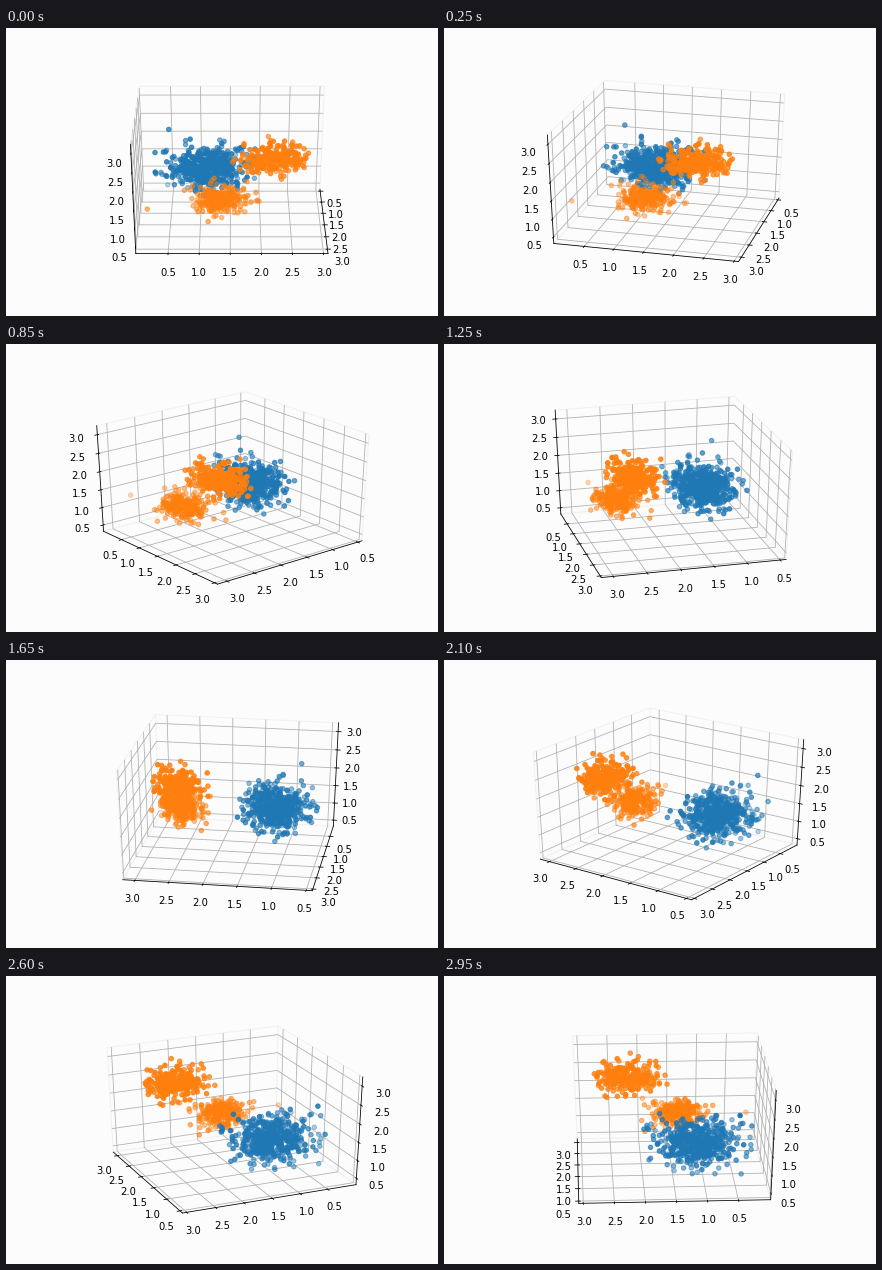
A matplotlib script for the animation above (3000 ms loop, 432x288 px).

```python
import numpy as np
import matplotlib.pyplot as plt
from matplotlib.animation import FuncAnimation

BG = "#fcfcfc"
FRAMES = 60
STEP = 180 / FRAMES  # half a turn per loop

rng = np.random.default_rng(4)


def blob(center, sigma, count):
    spread = np.clip(rng.normal(size=(count, 3)), -2.8, 2.8)
    return np.array(center) + spread * sigma


blue = np.vstack([
    blob((1.18, 1.11, 1.43), (0.22, 0.31, 0.27), 500),
    (0.89, 0.47, 2.32),  # lone high point
])
orange = np.vstack([
    blob((2.50, 2.19, 2.45), (0.17, 0.25, 0.19), 250),
    blob((2.56, 1.35, 1.40), (0.15, 0.22, 0.17), 250),
    (2.76, 0.17, 1.27),  # lone stray
])

fig = plt.figure(figsize=(6, 4), dpi=72, facecolor=BG)
fig.subplots_adjust(bottom=0.125)
ax = fig.add_subplot(projection="3d", facecolor=BG)

# Stretch a unit cube over the whole subplot instead of a square view.
ax.apply_aspect = lambda position=None: None
ax.set_box_aspect((1, 1, 1), zoom=3 ** 0.5 / 1.8294640721620434)

for points, color in ((blue, "tab:blue"), (orange, "tab:orange")):
    ax.scatter(*points.T, s=20, color=color)

ax.set(xlim=(0.411, 3.176), ylim=(-0.019, 3.072), zlim=(0.318, 3.238))
for axis in (ax.xaxis, ax.yaxis, ax.zaxis):
    axis.set_ticks(np.arange(0.5, 3.1, 0.5))
    axis.pane.set(facecolor=BG, edgecolor="#f1f1f1", alpha=1)


def turn(i):
    # The small offset keeps the head-on view from flipping its side panes.
    ax.view_init(elev=30, azim=STEP * i + 0.01)
    return ()


anim = FuncAnimation(fig, turn, frames=FRAMES, interval=50,
                     init_func=lambda: turn(0), repeat=True, repeat_delay=0)
plt.show()
```
